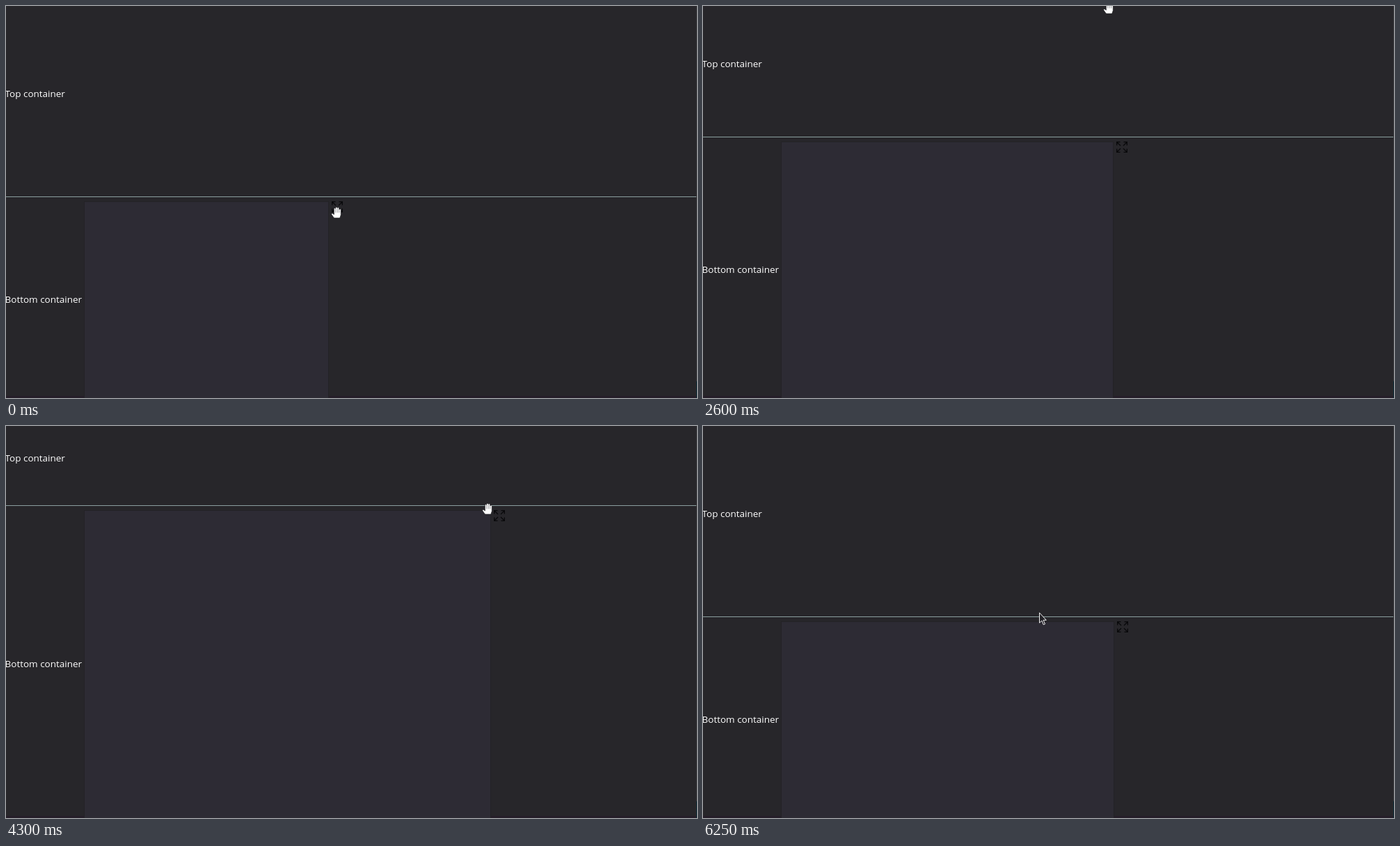
An HTML page that plays this animation: 993 by 564 pixels, repeating every 6550 ms.

```html
<!DOCTYPE html>
<html lang="en">
<head>
<meta charset="utf-8">
<title>Split container</title>
<style>
  html, body { margin: 0; width: 100%; height: 100%; overflow: hidden; background: #27262a; }
  svg { display: block; }
  text { font: 13.5px "Open Sans", "Noto Sans", sans-serif; fill: #fff; }
</style>
</head>
<body>
<svg width="993" height="564" viewBox="0 0 993 564">
  <rect width="993" height="564" fill="#27262a"/>
  <rect y="561" width="993" height="3" fill="#251e29"/>
  <rect id="panel" x="112.5" fill="#2d2b34" stroke="#232226"/>
  <rect x="992" width="1" height="540" fill="#38393d"/>
  <rect x="992" y="540" width="1" height="24" fill="#0d2b35"/>
  <rect id="line" width="992" height="1" fill="#8b9f9f"/>
  <text id="top" x="-1.5">Top container</text>
  <text id="bottom" x="-1.5">Bottom container</text>
  <g id="icon" fill="none" stroke="#09090b" stroke-width="1.3">
    <path id="pair" d="M.7 5.5V.7H5.5M.7 .7 6 6M10.5 .7H15.3V5.5M15.3 .7 10 6"/>
    <use href="#pair" transform="matrix(1 0 0 -1 0 16)"/>
  </g>
  <g id="hand" stroke-linecap="round" stroke-linejoin="round">
    <path d="M-4 7.5 -7.3 2.8Q-7.6 1 -5.8 1.3L-3.7 3V-5.5Q-2.5 -7 -1.4 -5.5V-7Q0 -8.5 1.2 -7V-6.5Q2.5 -8 3.7 -6.3V-4.5Q5.5 -5.7 6.3 -4V3.5L4.8 8H-3Z"
      fill="#fff" stroke="#1b1a1e" stroke-width=".7"/>
    <path d="M-1.3 -5V0M1.2 -6V0M3.7 -5V0" stroke="#55545a" stroke-width=".6"/>
  </g>
  <path id="arrow" d="M.5 .7V15.2L3.9 12.1 6.2 17.8 8.5 16.9 6.1 11.3H10.3Z"
    fill="#242328" stroke="#f2f2f2"/>
</svg>
<script>
const LOOP = 6550, STEP = 50, LAG = 100, MAX_SPLIT = 274;
const el = id => document.getElementById(id);
const [panel, line, topText, bottomText, icon, hand, arrow] =
  ["panel", "line", "top", "bottom", "icon", "hand", "arrow"].map(el);

// Pointer path: [time, x, y]
const path = [[450, 475, 297], [1050, 497, 217], [1150, 497, 217], [1250, 582, 227],
  [1750, 825, 262], [2050, 720, 0], [2350, 580, 215], [2500, 554, 128], [2650, 600, -30],
  [2950, 656, 130], [3050, 656, 130], [3450, 708, 206], [3650, 584, 130], [3950, 560, 14],
  [4200, 589, 54], [4300, 692, 119], [4600, 800, 330], [5000, 734, 340], [5100, 734, 340],
  [5500, 540, 14], [6000, 483, 271]];

// Smooth curve through the path, flat at turning points
function pointer(t, c) {
  const last = path.length - 1;
  if (t <= path[0][0]) return path[0][c];
  if (t >= path[last][0]) return path[last][c];
  const i = path.findIndex(p => p[0] > t) - 1;
  const rate = j => (path[j + 1][c] - path[j][c]) / (path[j + 1][0] - path[j][0]);
  const slope = j => {
    if (j === 0 || j === last) return 0;
    const a = rate(j - 1), b = rate(j);
    return a * b <= 0 ? 0 : 2 * a * b / (a + b);
  };
  const h = path[i + 1][0] - path[i][0], u = (t - path[i][0]) / h, v = 1 - u;
  return path[i][c] * v * v * (1 + 2 * u) + path[i + 1][c] * u * u * (3 - 2 * u)
    + h * u * v * (slope(i) * v - slope(i + 1) * u);
}

// The split trails the pointer; between drags it rests where it was dropped
function layout(t) {
  if (t < 1150) return [463, MAX_SPLIT];
  const second = t >= 3750;
  const s = (second ? t : Math.min(t, 3050)) - LAG;
  return [pointer(s, 1) + (second ? 107 : 35), Math.min(MAX_SPLIT, pointer(s, 2) + 60)].map(Math.round);
}

const set = (node, attrs) => {
  for (const name in attrs) node.setAttribute(name, attrs[name]);
};
const place = (node, x, y) => set(node, { transform: `translate(${x} ${y})` });
const show = (node, on) => set(node, { visibility: on ? "visible" : "hidden" });

function draw(t) {
  const [right, split] = layout(t);
  const x = Math.round(pointer(t, 1)), y = Math.round(pointer(t, 2));
  const released = t >= 2950 && t < 3400 || t >= 6250;

  set(line, { y: split });
  set(panel, { y: split + 7.5, width: right - 112, height: 564 - split });
  set(topText, { y: Math.round(split / 2 - 6) });
  set(bottomText, { y: Math.round(split / 2 + 290) });
  place(icon, right + 5, split + 7);
  place(hand, x, y);
  place(arrow, x, y - 3);
  show(hand, !released);
  show(arrow, released);
}

const start = performance.now();
function tick() {
  const t = (performance.now() - start) % LOOP;
  draw(Math.floor(t / STEP) * STEP);
  requestAnimationFrame(tick);
}
tick();
</script>
</body>
</html>
```
